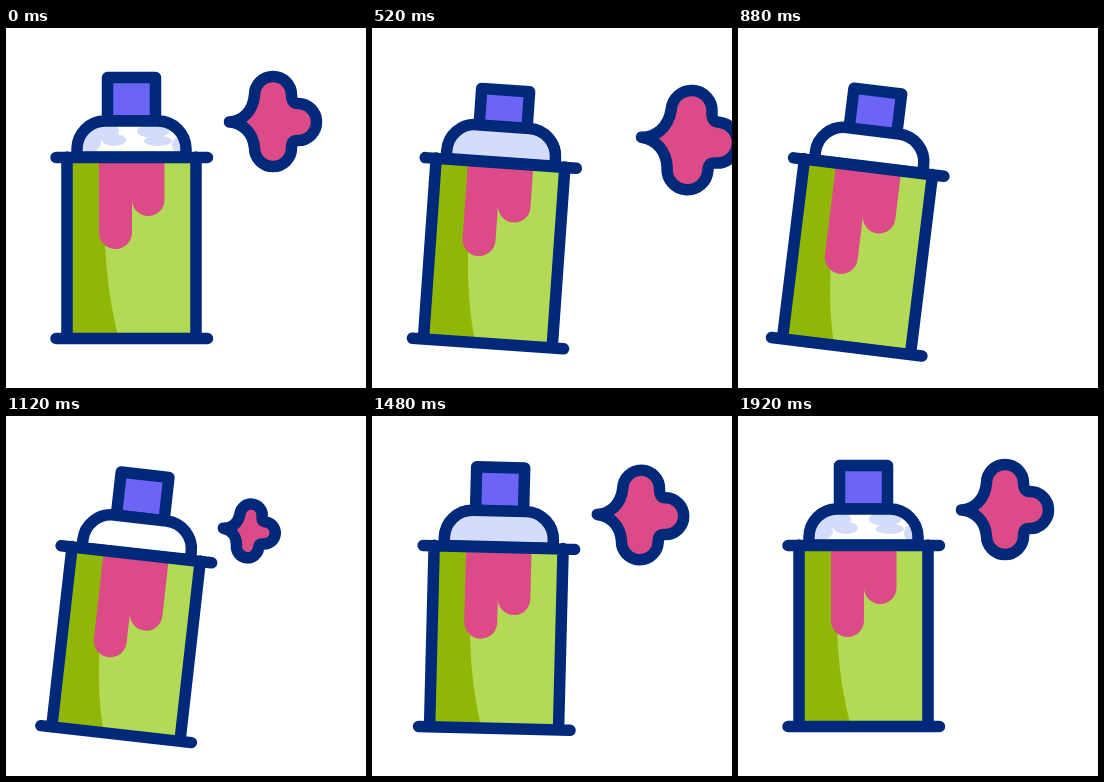
Recreate the animation shown at these times as an HTML page. Size 360 px wide and 360 px high, loop 1.96 s.

```html
<!DOCTYPE html>
<html lang="en">
<head>
<meta charset="utf-8">
<title>Spray can</title>
<style>
  html, body { margin: 0; width: 100%; height: 100%; overflow: hidden; background: #fff; }
  svg { display: block; width: 100%; height: 100%; }
  .line { stroke: #00297a; stroke-width: 11.5; stroke-linecap: round; stroke-linejoin: round; fill: none; }
  .pink { fill: #dc4b87; }
  .tint { fill: #d5dcfa; }
</style>
</head>
<body>
<svg viewBox="0 0 360 360">
  <defs>
    <path id="domeShape" d="M71 129V121A28 28 0 0 1 99 93H152A28 28 0 0 1 180 121V129Z"/>
    <clipPath id="domeClip"><use href="#domeShape"/></clipPath>
  </defs>
  <g id="all">
    <path id="cap" class="line" style="fill:#6b64f6" d="M101.5 49.5H149.5V93H101.5Z"/>

    <use href="#domeShape" fill="#fff"/>
    <use id="fullTint" class="tint" href="#domeShape"/>
    <g id="patches" class="tint" clip-path="url(#domeClip)">
      <ellipse cx="93" cy="103" rx="20" ry="9"/>
      <ellipse cx="84" cy="115" rx="11" ry="9"/>
      <ellipse cx="108" cy="112" rx="12" ry="6"/>
      <ellipse cx="147" cy="103" rx="16" ry="7"/>
      <ellipse cx="152" cy="113" rx="14" ry="5"/>
      <ellipse cx="173" cy="117" rx="7" ry="8"/>
    </g>
    <use href="#domeShape" class="line"/>

    <path fill="#b2da54" d="M61 129H190V310H61Z"/>
    <path fill="#90b707" d="M61 129H100C97 190 97 253 113 310H61Z"/>
    <path id="drips" class="pink"/>
    <path class="line" d="M61 129V310.5M190 129V310.5M50 129.5H201.5M50 310.5H201.5"/>

    <path id="cloud" class="line" style="fill:#dc4b87" d="M223.5 94C236 93 247 84 248.5 67
      A18.5 18.5 0 0 1 285.5 67C285.5 72 287 75.5 292 75.5
      A18.5 18.5 0 0 1 292 112.5C287 112.5 285.5 115 285.5 120
      A18.5 18.5 0 0 1 248.5 120C247 104 236 95 223.5 94Z"/>
  </g>
</svg>
<script>
const LOOP = 1960, STEP = 40, STROKE = 11.5;
const $ = id => document.getElementById(id);
const all = $('all'), cap = $('cap'), drips = $('drips'), cloud = $('cloud');
const fullTint = $('fullTint'), patches = $('patches');

const part = (t, from, to) => Math.min(1, Math.max(0, (t - from) / (to - from)));
const ease = (t, from, to) => { const u = part(t, from, to); return u * u * (3 - 2 * u); };
// Eases up during a..b and back down during c..d
const swell = (t, a, b, c, d) => ease(t, a, b) - ease(t, c, d);

// Look of the dome from each time on
const shine = [[0, 'patches'], [240, 'full'], [560, 'patches'], [880, 'plain'],
               [1240, 'full'], [1500, 'plain'], [1780, 'patches']];

const drip = (x, w, end) => {
  const r = w / 2;
  return `M${x} 129V${end - r}A${r} ${r} 0 0 0 ${x + w} ${end - r}V129Z`;
};

function drawCloud(t) {
  let shift = 0, size = 1;
  if (t < 940) {
    const g = Math.pow(Math.max(0, t - 200) / 440, 2.2);
    shift = 75 * g;
    size = 1 + 0.21 * g;
  } else {
    size = 1 - Math.pow(1 - part(t, 948, 1602), 3);
  }
  const shown = size > 0.02 && shift < 190;
  cloud.style.display = shown ? '' : 'none';
  if (!shown) return;
  cloud.setAttribute('transform',
    `translate(${188 + shift} 94) scale(${size}) translate(-188 -94)`);
  cloud.style.strokeWidth = STROKE / size;
}

function draw(t) {
  const tilt = 7 * swell(t, 200, 780, 1000, 1680);
  all.setAttribute('transform', `rotate(${tilt} 50 175)`);

  const press = 7 * swell(t, 160, 460, 760, 1000);
  cap.setAttribute('transform', `translate(0 ${press})`);

  const left = 221 + 18 * swell(t, 400, 860, 943, 1513);
  const right = 188 + 17.5 * swell(t, 660, 1200, 1200, 1760);
  drips.setAttribute('d', drip(93, 33, left) + drip(126, 32.5, right));

  const look = shine.filter(([from]) => t >= from).pop()[1];
  fullTint.style.display = look === 'full' ? '' : 'none';
  patches.style.display = look === 'patches' ? '' : 'none';

  drawCloud(t);
}

const start = performance.now();
function tick() {
  const t = (performance.now() - start) % LOOP;
  draw(Math.floor(t / STEP) * STEP);
  requestAnimationFrame(tick);
}
tick();
</script>
</body>
</html>
```
